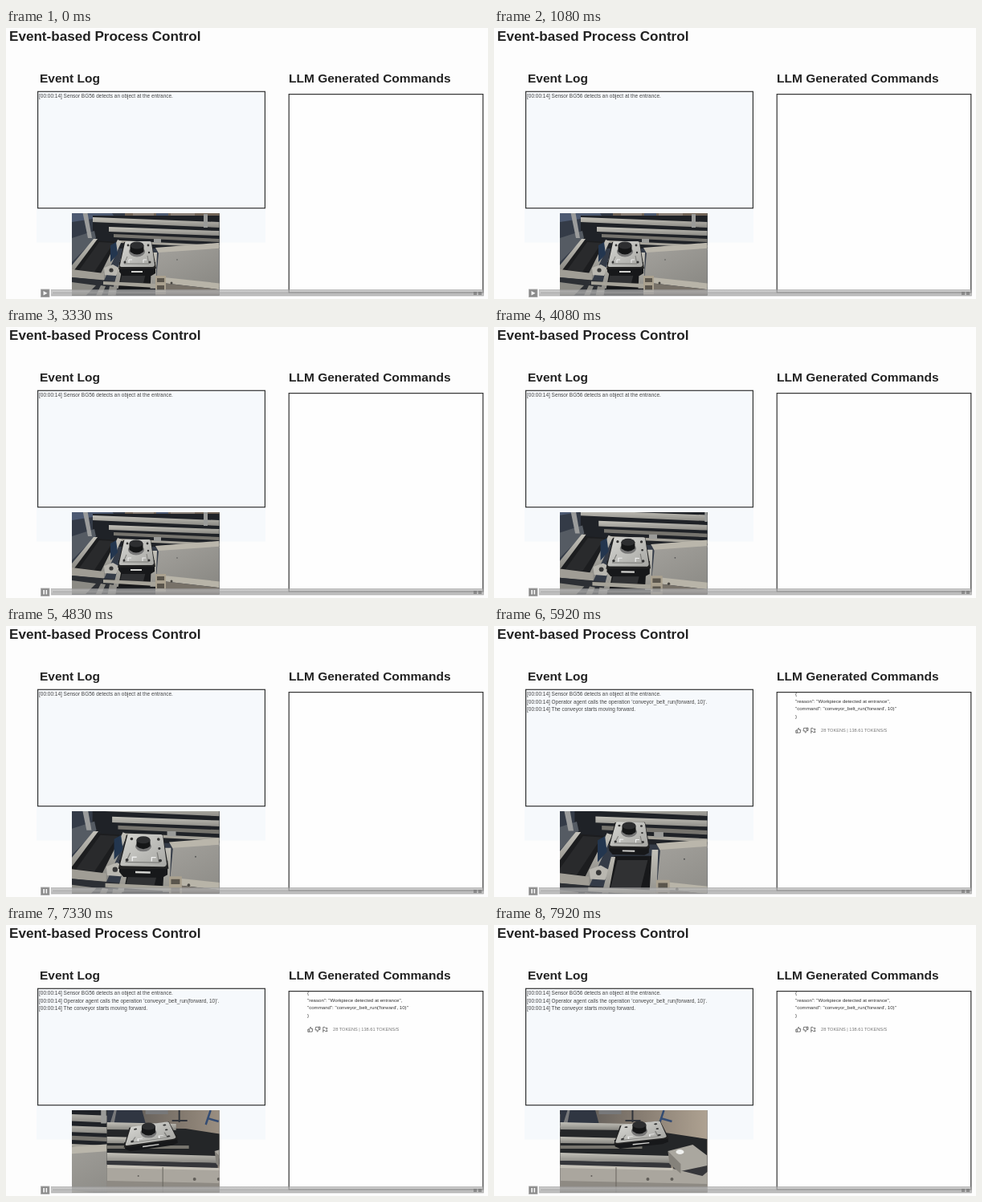
Write an HTML page that moves like this. It is 600 by 338 pixels and loops after 8 s.

```html
<!DOCTYPE html>
<html lang="en">
<head>
<meta charset="utf-8">
<title>Event-based Process Control</title>
<style>
  html, body { margin: 0; width: 100%; height: 100%; overflow: hidden; background: #fdfdfd; }
  svg { display: block; }
  text { font-family: "Liberation Sans", Arial, sans-serif; white-space: pre; }
  .head { font-weight: bold; font-size: 15.5px; fill: #222; }
  .log { font-size: 6.48px; fill: #444; }
  .cmd { font-size: 6.1px; fill: #333; }
  .frame { stroke: #333; stroke-width: 1.2; }
</style>
</head>
<body>
<svg width="600" height="338" viewBox="0 0 600 338">
  <defs>
    <clipPath id="photo"><rect x="82" y="231" width="183.5" height="102.5"/></clipPath>
    <clipPath id="panel"><rect x="353" y="83" width="240" height="246"/></clipPath>
    <linearGradient id="metal" x2="0" y2="1"><stop stop-color="#c3c1b9"/><stop offset="1" stop-color="#85847f"/></linearGradient>
    <linearGradient id="top" x2="1" y2="1"><stop stop-color="#d6d6d2"/><stop offset="1" stop-color="#a6a6a2"/></linearGradient>
    <linearGradient id="plate" x2="1" y2="1"><stop stop-color="#a3a19c"/><stop offset="1" stop-color="#85847f"/></linearGradient>
    <linearGradient id="wall" x2="1" y2="0"><stop stop-color="#514f4e"/><stop offset=".5" stop-color="#857b70"/><stop offset="1" stop-color="#b3a695"/></linearGradient>
    <linearGradient id="bar" x2="0" y2="1"><stop stop-color="#aaa"/><stop offset=".4" stop-color="#bbb"/><stop offset="1" stop-color="#999"/></linearGradient>
  </defs>

  <rect width="600" height="338" fill="#fdfdfd"/>
  <text x="4" y="16" class="head" style="font-size:17.1px">Event-based Process Control</text>
  <text x="42" y="68" class="head">Event Log</text>
  <text x="352" y="68" class="head">LLM Generated Commands</text>

  <rect x="38" y="79" width="285" height="188.5" fill="#f6f9fc"/>
  <rect x="39.6" y="79.3" width="282.8" height="145.4" fill="#f6f9fc" class="frame"/>
  <rect x="352.2" y="82.6" width="241.6" height="247.4" fill="#fefefe" class="frame"/>

  <g class="log">
    <text x="41" y="87">[00:00:14] Sensor BG56 detects an object at the entrance.</text>
    <text x="41" y="97" data-from="5000">[00:00:14] Operator agent calls the operation 'conveyor_belt_run(forward, 10)'.</text>
    <text x="41" y="106.4" data-from="5170">[00:00:14] The conveyor starts moving forward.</text>
  </g>

  <g class="cmd" clip-path="url(#panel)" data-from="4920">
    <text x="375" y="87">{</text>
    <text x="375" y="96">"reason": "Workpiece detected at entrance",</text>
    <text x="375" y="105.4">"command": "conveyor_belt_run('forward', 10)"</text>
    <text x="375" y="114.6">}</text>
    <g fill="none" stroke="#555" stroke-width=".8">
      <path id="thumb" d="M375.8 130h1.6v3.3h-1.6zM377.4 130l1.6-2.8q1.2.1.6 2.3h2.2l-.6 3.6h-3.8"/>
      <use href="#thumb" transform="rotate(180 383.4 130.2)"/>
      <path d="M394.8 134v-6.6h2l1 1.2h2.2l-1 2 1 2h-2.4l-.8-1h-2"/>
    </g>
    <text x="407" y="132.4" style="font-size:5.64px" fill="#777">28 TOKENS | 138.61 TOKENS/S</text>
  </g>

  <g clip-path="url(#photo)">
    <rect x="82" y="231" width="184" height="103" fill="#35363a"/>
    <g id="station">
      <path fill="#343b47" d="M60 215H290V345H60z"/>
      <path fill="#716457" d="M148 222H290V240L148 237z"/>
      <path fill="#8a8078" d="M158 222h26v13h-26zM205 222h30v14h-30z"/>
      <path fill="#4d5a72" d="M82 222h44l8 12-52 8zM187 230h15v7h-15z"/>
      <path fill="#1f2227" d="M108 234H290V275H108z"/>
      <path fill="url(#metal)" d="M108 236L290 243V250L108 242z"/>
      <path fill="url(#metal)" d="M128 248L290 254V260L128 254z"/>
      <path fill="#76746e" d="M134 257L290 264V268L134 261z"/>
      <path fill="#a6a39a" d="M142 265L290 272V275L142 268z"/>
      <path fill="#555b63" d="M82 262L110 253 112 262 82 292z"/>
      <path fill="#9b9c9c" d="M95 228h6l6 34h-5z"/>
      <path fill="#1c1d1f" d="M112 265L140 267 121 306 81 302z"/>
      <path fill="#292a2c" d="M116 267L134 268 110 304 91 302z"/>
      <path fill="url(#metal)" d="M109 263L114 263 82 306V296z"/>
      <path fill="url(#metal)" d="M139 264L144 266 122 315 114 314z"/>
      <path fill="#a09d95" d="M82 301L122 306V315L82 311z"/>
      <path fill="#2c2f34" d="M82 311L140 316V334H82z"/>
      <path fill="#8b8a84" d="M82 317l30 4-13 13H82zM118 321l6 1-6 14h-7zM129 322l7 1-2 14h-8z"/>
      <path fill="#23364f" d="M130 271l7-4 2 15-9 10z"/>
      <path fill="#b9b7b0" d="M122 299l11-4 9 5-5 9-14-1z"/>
      <circle cx="131" cy="302" r="2.6" fill="#363636"/>
      <path fill="#17181a" d="M146 286H184L184 325H135z"/>
      <path fill="#303133" d="M149 290H178L171 318H142z"/>
      <path fill="url(#metal)" d="M143 287h4l-9 47h-7zM182 280h6l-2 54h-7z"/>
      <path fill="#a6a399" d="M121 316L186 319V324L121 320z"/>
      <path fill="#1d1f22" d="M138 325h48v12h-50z"/>
      <path fill="#bab6ab" d="M186 274L290 266V275L190 281z"/>
      <path fill="url(#plate)" d="M190 280L290 273V326L187 313z"/>
      <path fill="#b8b4a8" d="M187 310L290 321V329L186 317z"/>
      <path fill="#777168" d="M186 317L290 329V345H186z"/>
      <path fill="#aaa18f" d="M186 309h13v23h-13z"/>
      <path fill="#5a554c" d="M188 312h9v5h-9zM188 321h9v6h-9z"/>
      <circle cx="206" cy="318" r="1.5" fill="#484641"/><circle cx="213" cy="289" r=".8" fill="#555"/>
      <path fill="#9a9b99" d="M246 232h5v17h-5zM184 263h9v5h-9z"/>
    </g>

    <g id="outfeed">
      <path fill="url(#wall)" d="M82 225H275V340H82z"/>
      <path fill="#303642" d="M82 225h42l6 22H82z"/>
      <path fill="#77787a" d="M91 231h3l-3 16h-5zM130 231h28v5h-28z"/>
      <path fill="none" stroke="#31343a" stroke-width="2" d="M172 230v16M163 244h19"/>
      <path fill="none" stroke="#344c73" stroke-width="2.5" d="M211 231l-6 18M207 241l14 4"/>
      <path fill="#242628" d="M82 253L180 254 265 267V298H82z"/>
      <path fill="url(#metal)" d="M82 246L168 248V256L82 255z"/>
      <path fill="url(#metal)" d="M82 264L166 266V273L82 272z"/>
      <path fill="#77756e" d="M82 275H184V279H82z"/>
      <path fill="url(#metal)" d="M82 284L220 288V297L82 294z"/>
      <path fill="#35363a" d="M82 294L220 297V303H82z"/>
      <path fill="#aaa69e" d="M82 301L265 305V340H82z"/>
      <path fill="#c5c1b7" d="M82 299L222 303V306L82 303z"/>
      <path fill="#8e8a83" d="M82 319L265 323V340H82z"/>
      <path fill="#68645e" d="M151 302h1v32h-1z"/>
      <g fill="#615e59"><circle cx="191" cy="317" r="2"/><circle cx="221" cy="317" r="2"/><circle cx="121" cy="313" r="1"/></g>
      <path fill="#36363a" d="M217 284l6 20 36 9 7-6V288z"/>
      <path fill="#aaa79f" d="M216 282L247 274 267 289 265 300 232 307z"/>
      <path fill="#85827b" d="M216 282l16 16v12l-14-12z"/>
      <ellipse cx="231" cy="283" rx="5" ry="3" fill="#f0f1ef"/>
    </g>

    <g id="carrier">
      <path fill="#17181a" d="M-22 17L23 17 23 31 18 34-18 34-22 29z"/>
      <path fill="#222" d="M-16-8L18-9 24 25-23 26z"/>
      <path fill="url(#top)" d="M-13-9L16-9Q18-9 18-7L22 20Q22 23 19 23H-19Q-22 23-21 20L-15-7Q-15-9-13-9z"/>
      <path fill="none" stroke="#7e7e7b" d="M-12 10L-16 19H15L13 9"/>
      <g fill="#333"><circle cx="-15" cy="17" r="1.5"/><circle cx="16" cy="17" r="1.5"/><circle cx="14" cy="-4" r="1.4"/><circle cx="-11" cy="-4" r="1.4"/><circle cx="15" cy="5" r="1.2"/></g>
      <path fill="#d2d2cf" d="M-7 28h14v2H-7z"/>
      <path fill="none" stroke="#eee" d="M-10 18v-4h4M8 18v-4h4"/>
    </g>
    <g id="knob">
      <ellipse cy="4" rx="10" ry="6.5" fill="#777"/>
      <path fill="#151617" d="M-8.5-4V4Q0 11 8.5 4V-4z"/>
      <ellipse cy="-4" rx="8.5" ry="4.5" fill="#2d2e30"/>
    </g>
  </g>

  <g>
    <rect x="43.5" y="326" width="10.5" height="9.5" fill="#8a8a8a" stroke="#aaa" stroke-width=".8"/>
    <path id="play" fill="#f4f4f4" d="M46.5 328v5.6l5-2.8z"/>
    <path id="pause" fill="#f4f4f4" d="M46.3 328h1.7v5.6h-1.7zM49.5 328h1.7v5.6h-1.7z"/>
    <rect x="56.5" y="326.5" width="538" height="7.5" fill="url(#bar)" stroke="#999" stroke-width=".8" opacity=".72"/>
    <path stroke="#999" stroke-width=".8" d="M58 330.2H594"/>
    <path fill="#777" opacity=".7" d="M582 329h4v4h-4zM588 329h4v4h-4z"/>
  </g>
</svg>

<script>
const LOOP = 8000;
const el = id => document.getElementById(id);
const timed = [...document.querySelectorAll('[data-from]')];

// time, camera scale/x/y, knob x/y, carrier scale x/y, carrier angle, outfeed offset
const keys = [
  [0,    1,    0,    0,   163, 275, 1,    1,    0,   190],
  [2000, 1,    0,    0,   163, 275, 1,    1,    0,   190],
  [2580, 1,    0,    2,   163, 279, 1,    .95,  3,   190],
  [3330, 1,    0,    -1,  162, 274, 1,    1,    0,   190],
  [4750, 1.22, -24,  -65, 171, 271, 1.34, 1.26, 1,   190],
  [5170, 1.24, -27,  -69, 171, 269, 1.3,  1.22, 1,   190],
  [5920, 1.3,  -40,  -85, 168, 253, 1.1,  .95,  1,   190],
  [6750, 1.3,  -62,  -70, 168, 259, 1.42, .75,  -12, 184],
  [7580, 1.3,  -240, -78, 180, 254, 1.48, .68,  -7,  5],
  [8000, 1.3,  -245, -78, 181, 253, 1.48, .68,  -6,  0]
];

function poseAt(t) {
  const i = keys.findIndex(k => k[0] > t);
  const a = keys[i - 1], b = keys[i];
  const u = (t - a[0]) / (b[0] - a[0]);
  const ease = u * u * (3 - 2 * u);
  return a.map((v, j) => v + (b[j] - v) * ease);
}

const show = (node, on) => node.setAttribute('visibility', on ? 'visible' : 'hidden');
const move = (id, transform) => el(id).setAttribute('transform', transform);

function draw() {
  const t = performance.now() % LOOP;
  const [, zoom, camX, camY, x, y, sx, sy, angle, slide] = poseAt(t);
  move('station', `translate(${camX} ${camY}) scale(${zoom})`);
  move('outfeed', `translate(${slide} 0)`);
  move('carrier', `translate(${x} ${y}) rotate(${angle}) scale(${sx} ${sy})`);
  move('knob', `translate(${x} ${y})`);
  timed.forEach(node => show(node, t >= +node.dataset.from));
  show(el('play'), t < 2000);
  show(el('pause'), t >= 2000);
  requestAnimationFrame(draw);
}
draw();
</script>
</body>
</html>
```
